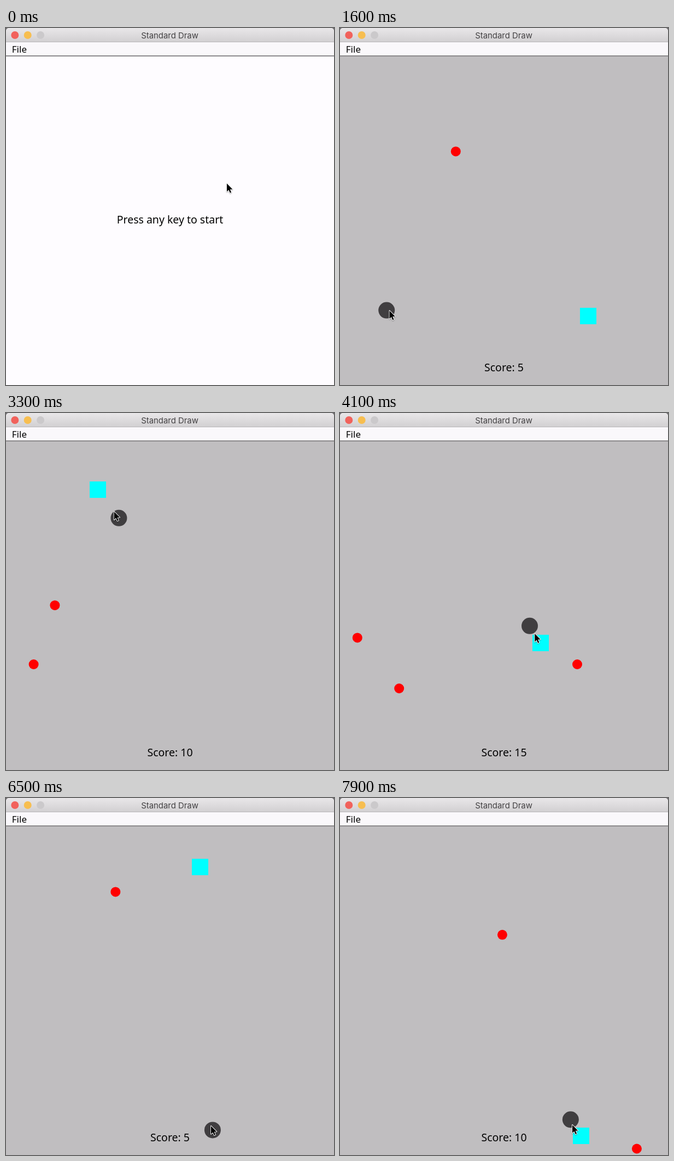
Recreate the animation shown at these times as an HTML page with a canvas. Size 600x652 px, loop 8 s.

```html
<!DOCTYPE html>
<html lang="en">
<head>
<meta charset="utf-8">
<title>Standard Draw</title>
<style>
  html, body { margin: 0; width: 100%; height: 100%; overflow: hidden; }
  canvas { display: block; }
</style>
</head>
<body>
<canvas id="stage" width="600" height="652"></canvas>
<script>
const ctx = document.getElementById('stage').getContext('2d');
const LOOP = 8000, STEP = 100, LAG = 30;
const BODY_FONT = '"Noto Sans", sans-serif';
const games = [{ start: 600, end: 4400 }, { start: 5600, end: LOOP }];

const stop = (at, x, y) => ({ at, x, y });
// Reaching a food scores; usually it also releases a ball with a velocity in px/s.
const food = (at, x, y, ball) => ({ at, x, y, ball, isFood: true });
const ball = (x, y, vx, vy) => ({ x, y, vx, vy });

// The pointer travels smoothly through these places.
const route = [
  stop(0, 404, 284),
  stop(400, 362, 320),
  stop(900, 362, 320),
  food(1500, 80, 514, ball(219, 218, -72, 74)),
  food(2500, 454, 526, ball(25, 415, -72, 55)),
  food(3500, 168, 140, ball(467, 423, -55, 60)),
  food(4140, 367, 420),
  stop(4400, 418, 513),
  stop(5200, 246, 163),
  food(6350, 392, 622, ball(190, 163, 69, 56)),
  stop(6500, 375, 599),
  food(7000, 355, 126, ball(488, 591, 61, 55)),
  stop(7900, 425, 597),
  food(LOOP, 441, 617)
];

function slope(i, axis) {
  const a = route[i - 1], b = route[i], c = route[i + 1];
  if (!a || !c) return 0;
  const before = (b[axis] - a[axis]) / (b.at - a.at);
  const after = (c[axis] - b[axis]) / (c.at - b.at);
  return before * after > 0 ? 2 * before * after / (before + after) : 0;
}

// Monotone cubic interpolation of the route
function pointerAt(t) {
  const i = route.findIndex(place => place.at > t) - 1;
  const a = route[i], b = route[i + 1];
  const span = b.at - a.at, u = (t - a.at) / span, v = 1 - u;
  return ['x', 'y'].map(axis =>
    a[axis] * v * v * (1 + 2 * u) + b[axis] * u * u * (3 - 2 * u) +
    span * u * v * (slope(i, axis) * v - slope(i + 1, axis) * u));
}

const bounce = (p, low, high) => high - Math.abs(high - low - Math.abs(p - low));

function rect(x, y, w, h, fill) {
  ctx.fillStyle = fill;
  ctx.fillRect(x, y, w, h);
}

function disc(x, y, r, fill) {
  ctx.beginPath();
  ctx.arc(x, y, r, 0, 2 * Math.PI);
  ctx.fillStyle = fill;
  ctx.fill();
}

function text(string, x, y, size = 19.5, color = '#000', family = BODY_FONT, align = 'center') {
  ctx.font = `${size}px ${family}`;
  ctx.textAlign = align;
  ctx.fillStyle = color;
  ctx.fillText(string, x, y);
}

function drawWindow() {
  const bar = ctx.createLinearGradient(0, 0, 0, 25);
  bar.addColorStop(0, '#e9e7e9');
  bar.addColorStop(1, '#d2d0d2');
  rect(0, 0, 600, 25, '#6b696d');
  ctx.beginPath();
  ctx.roundRect(0, 0, 600, 25, [5, 5, 0, 0]);
  ctx.fillStyle = bar;
  ctx.fill();
  rect(0, 25, 600, 1, '#b9b7b9');
  rect(0, 26, 600, 24, '#faf8fb');
  rect(0, 50, 600, 2, '#8c8a8c');
  ['#f1625c', '#f7be50', '#cbc9cb'].forEach((color, i) => disc(16.3 + 23.4 * i, 13, 7, color));
  text('Standard Draw', 299.5, 18.5, 14.9, '#444244', 'Inter, sans-serif');
  text('File', 10.8, 45, 17, '#000', BODY_FONT, 'left');
}

function drawPointer([x, y]) {
  ctx.save();
  ctx.translate(x, y);
  ctx.scale(0.9, 0.9);
  ctx.beginPath();
  [[0, 0], [0, 16.5], [3.8, 13], [6.5, 19], [9, 18], [6.4, 12], [11.5, 11.6]]
    .forEach(point => ctx.lineTo(...point));
  ctx.closePath();
  ctx.shadowColor = 'rgba(0,0,0,.35)';
  ctx.shadowBlur = 2;
  ctx.shadowOffsetY = 1;
  ctx.strokeStyle = '#fff';
  ctx.lineWidth = 2;
  ctx.lineJoin = 'round';
  ctx.stroke();
  ctx.shadowColor = 'transparent';
  ctx.fillStyle = '#000';
  ctx.fill();
  ctx.restore();
}

function drawBall({ x, y, vx, vy }, seconds) {
  disc(bounce(x + vx * seconds, 9, 591), bounce(y + vy * seconds, 60, 643), 9, '#f00');
}

function drawGame({ start, end }, t) {
  const foods = route.filter(place => place.isFood && place.at > start && place.at <= end);
  const eaten = foods.filter(item => item.at <= t);
  const next = foods[eaten.length];
  if (t < end) {
    disc(...pointerAt(t - LAG), 15, '#403e40');
    if (next) rect(next.x - 15, next.y - 15, 30, 30, '#0ff');
    for (const item of eaten) {
      if (item.ball) drawBall(item.ball, (t - item.at) / 1000);
    }
  } else {
    text('Game over', 300, 356.5);
    text('Press any key to restart', 300, 387);
  }
  text(`Score: ${eaten.length * 5}`, 300, 626.5);
}

function draw(t) {
  const game = games.filter(g => g.start <= t).pop();
  rect(0, 51, 600, 601, game ? '#c0bec0' : '#fefcff');
  drawWindow();
  if (game) drawGame(game, t);
  else text('Press any key to start', 300, 356.5);
  drawPointer(pointerAt(t));
}

const startTime = performance.now();
function tick() {
  const t = (performance.now() - startTime) % LOOP;
  draw(Math.floor(t / STEP) * STEP);
  requestAnimationFrame(tick);
}
tick();
</script>
</body>
</html>
```
